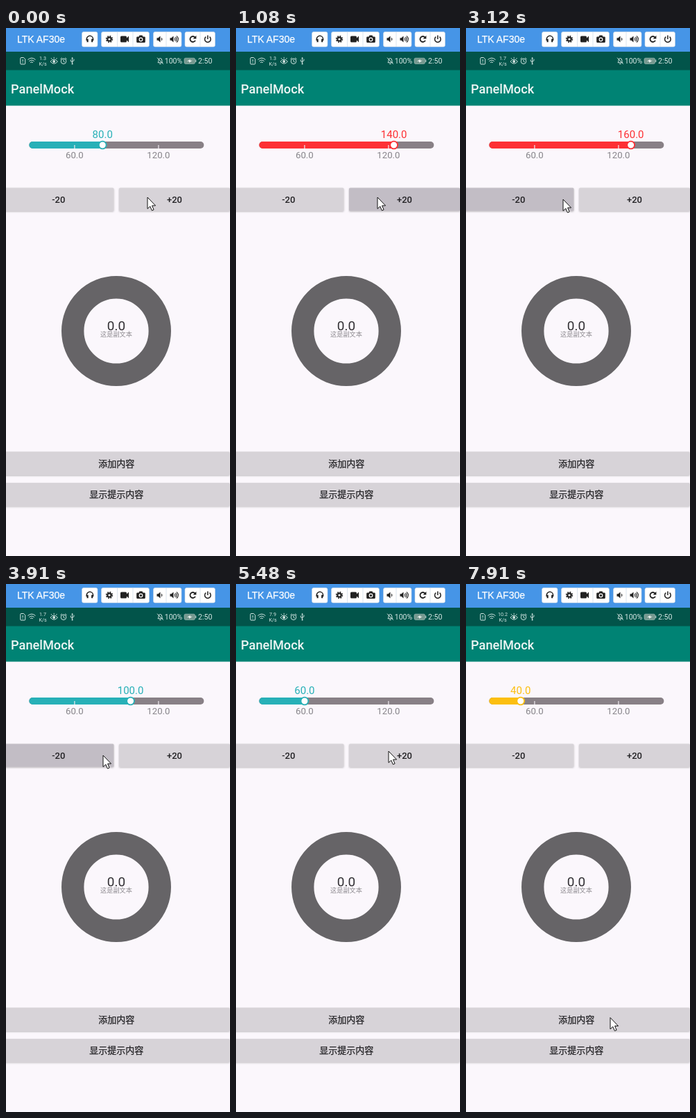
An HTML page that plays this animation: 323 px wide and 758 px high, repeating every 8 s.

```html
<!DOCTYPE html>
<html lang="zh">
<head>
<meta charset="utf-8">
<title>Gauge screen</title>
<style>
html, body { margin: 0; width: 100%; height: 100%; overflow: hidden; background: #fbf7fc; }
svg { display: block; width: 100vw; height: 100vh; }
text { font-family: Roboto, "Noto Sans CJK SC", "Noto Sans CJK", sans-serif; }
.mid { text-anchor: middle; }
.btn { font-size: 13px; font-weight: 500; fill: #222124; text-anchor: middle; }
.wide { stroke: #222124; stroke-width: .25; }
.tick { font-size: 13.2px; fill: #87858a; text-anchor: middle; }
.bar { fill: none; stroke-width: 10; stroke-linecap: round; }
.line { fill: none; stroke: #d3e4e1; stroke-width: 1; }
.key { fill: #fff; stroke: #c4d3e2; stroke-width: .6; }
.ico { fill: #222; }
.pen { fill: none; stroke: #222; stroke-width: 1.5; }
</style>
</head>
<body>
<svg viewBox="0 0 323 758">
  <defs>
    <filter id="shade" x="-5%" y="-20%" width="110%" height="150%">
      <feDropShadow dx="0" dy="1" stdDeviation=".8" flood-color="#555" flood-opacity=".38"/>
    </filter>
  </defs>

  <!-- mirror window toolbar -->
  <rect width="323" height="34.5" fill="#4695e7"/>
  <text x="16" y="21" fill="#fff" stroke="#fff" stroke-width=".25" font-size="14" style="font-family:'Liberation Sans',Arial,sans-serif">LTK AF30e</text>
  <g class="key">
    <rect x="109.5" y="5.5" width="22.5" height="21.5" rx="2.5"/>
    <rect x="137.5" y="5.5" width="69" height="21.5" rx="2.5"/>
    <rect x="212.5" y="5.5" width="40.5" height="21.5" rx="2.5"/>
    <rect x="258" y="5.5" width="43.5" height="21.5" rx="2.5"/>
    <path d="M160.5 6V27M183 6V27M231 6V27M280 6V27"/>
  </g>
  <path class="pen" d="M116.2 18V16a4.7 4.7 0 0 1 9.4 0V18"/>
  <path class="ico" d="M116.5 15.8h2.2v4.4h-2.2zM123.1 15.8h2.2v4.4h-2.2z"/>
  <circle class="pen" cx="149" cy="16" r="2.7" style="stroke-width:2.2"/>
  <circle class="pen" cx="149" cy="16" r="4.4" style="stroke-width:1.6;stroke-dasharray:1.73 1.73"/>
  <path class="ico" d="M166.5 11.5h6q1.5 0 1.5 1.5v1.5l3-3v9l-3-3v1.5q0 1.5-1.5 1.5h-6q-1.5 0-1.5-1.5v-6q0-1.5 1.5-1.5z"/>
  <path class="ico" d="M189.5 12.5h2l1-2h4l1 2h2q1.3 0 1.3 1.3v5.9q0 1.3-1.3 1.3h-10q-1.3 0-1.3-1.3v-5.9q0-1.3 1.3-1.3z"/>
  <circle cx="194.5" cy="16.5" r="2.3" fill="none" stroke="#fff" stroke-width="1.2"/>
  <path class="ico" d="M217.5 14.3h2l3-2.8v9l-3-2.8h-2zM236.5 14.3h2l3-2.8v9l-3-2.8h-2z"/>
  <path class="pen" style="stroke-width:1.1" d="M224 14.3q1.7 1.7 0 3.4M243 14.3q1.7 1.7 0 3.4M244.5 12.8q3.2 3.2 0 6.4M246 11.3q4.8 4.7 0 9.4"/>
  <path class="pen" style="stroke-width:1.8" d="M272.5 13.4A4 4 0 1 0 273 17.8"/>
  <path class="ico" d="M274.4 10.8v4.7h-4.7z"/>
  <path class="pen" d="M288.3 12.7a4.3 4.3 0 1 0 5.2 0M290.9 10.6V16"/>

  <!-- status bar -->
  <rect y="34" width="323" height="27" fill="#02544a"/>
  <g class="line">
    <path d="M20.8 43.5q0-1 1-1h3.7l2.2 2.2v6.3q0 1-1 1h-4.9q-1 0-1-1zM24.2 45v3.3M24.2 49.4v1"/>
    <path d="M31.5 45.5q5.5-4.8 11 0M33.3 47.7q3.7-3.2 7.4 0M35.1 49.6q1.9-1.6 3.8 0"/>
    <path d="M64 48.2q5.2-6.4 10.4 0q-5.2 6-10.4 0zM66 44.5l-1-1.5M69.2 43.6v-1.8M72.4 44.5l1-1.5"/>
    <circle cx="69.2" cy="48" r="1.5" fill="#d3e4e1"/>
    <circle cx="83" cy="47.7" r="3.8"/>
    <path d="M83 45.3v2.6l1.7 1M78.5 44.7l2.2-2M87.5 44.7l-2.2-2"/>
    <path d="M95.6 43v8.5M93.3 45.5v2.2l2.3 1.6M97.9 44.6v2.2l-2.3 1.6"/>
    <path d="M219 49.7q1-1 1-3.2q0-3 2.4-3t2.4 3q0 2.2 1 3.2zM221.3 51.5h2.2M218 42.7l8.8 9"/>
  </g>
  <path fill="#d3e4e1" d="M94.3 43.7l1.3-2 1.3 2z"/>
  <circle cx="95.6" cy="51.6" r="1" fill="#d3e4e1"/>
  <g fill="#d8e7e4" font-size="10.6">
    <text x="228.7" y="51">100%</text>
    <text x="277" y="51">2:50</text>
    <g class="mid" font-size="7.2">
      <text id="speed" x="53" y="46.2"></text>
      <text x="53" y="53.6">K/s</text>
    </g>
  </g>
  <rect x="257" y="43.2" width="15.5" height="8.2" rx="1.8" fill="#76988f" stroke="#9dbab5" stroke-width=".7"/>
  <path fill="#9dbab5" d="M273 45.5h1.4v3.6H273z"/>
  <path fill="#eef5f3" d="M261 47.8l4.7-2.9v1.9h3l-4.7 3v-2z"/>

  <!-- app bar -->
  <rect y="60.5" width="323" height="51" fill="#008374"/>
  <text x="7" y="93.5" fill="#eff6f5" font-size="18.2" font-weight="500">PanelMock</text>

  <!-- slider -->
  <path class="bar" d="M38.4 168H280.4" stroke="#888086"/>
  <path id="fill" class="bar"/>
  <path d="M98.9 168v5M219.9 168v5" stroke="#eeeaf0" stroke-width="1.2"/>
  <text class="tick" x="98.9" y="187">60.0</text>
  <text class="tick" x="219.9" y="187">120.0</text>
  <circle id="thumb" cy="168" r="5.4" fill="#fff" stroke-width="1.8"/>
  <text id="label" class="mid" y="157.6" font-size="15"></text>

  <g id="buttons"></g>

  <!-- ring -->
  <circle cx="159" cy="435" r="62.8" fill="none" stroke="#666467" stroke-width="32.4"/>
  <text class="mid" x="159" y="434" font-size="19" fill="#333135">0.0</text>
  <text class="mid" x="159" y="443.4" font-size="9.2" fill="#8e8b90">这是副文本</text>

  <path id="cursor" d="M0 0V16.5L3.8 13 6.4 19 9.1 17.9 6.6 12H11.6Z" fill="#fff" stroke="#111" stroke-width="1"/>
</svg>
<script>
const LOOP = 8000;
const STEP = 130;   // refresh interval of the mirrored screen
const SLIDE = 200;  // time the thumb takes to reach a new value
const $ = id => document.getElementById(id);
const clamp = v => Math.max(0, Math.min(1, v));
const ease = u => u * u * (3 - 2 * u);
const mix = (a, b, u) => a + (b - a) * u;

// Clicks on each button; one click changes the value by 20.
const ups = [100, 500, 880, 1640, 2250, 5860];
const downs = [2950, 3440, 3570, 3700, 4170, 4510, 6490, 6560];

// Pointer moves: start, end, target x, target y.
const home = [204, 243];
const moves = [
  [1300, 1430, 202, 249],
  [2340, 2730, 140, 246],
  [5110, 5460, 220, 240],
  [5900, 6240, 117, 243],
  [6900, 7480, 217, 571],
  [7480, 7800, 208, 622.5]
];
const speeds = { 0: '1.3', 1560: '1.7', 4550: '7.9', 7540: '10.2' };

const past = (list, t) => list.filter(k => k <= t);
const valueAt = t => 80 + 20 * (past(ups, t).length - past(downs, t).length);

// The zones 0-60, 60-120 and 120-260 fill a quarter, a half and a quarter of the track.
function position(v) {
  const share = clamp(v / 60) + 2 * clamp((v - 60) / 60) + clamp((v - 120) / 140);
  return 38.4 + 60.5 * share;
}

function pointerAt(t) {
  return moves.reduce(([x, y], [from, to, nx, ny]) => {
    const u = ease(clamp((t - from) / (to - from)));
    return [mix(x, nx, u), mix(y, ny, u)];
  }, home);
}

function button(x, y, w, h, name, id) {
  const ripple = id ? `<clipPath id="${id}Clip"><rect x="${x}" y="${y}" width="${w}" height="${h}" rx="1.5"/></clipPath>
    <g clip-path="url(#${id}Clip)" fill="#1c1830"><rect id="${id}Tint" x="${x}" y="${y}" width="${w}" height="${h}"/>
    <circle id="${id}Wave"/></g>` : '';
  return `<rect x="${x}" y="${y}" width="${w}" height="${h}" rx="1.5" fill="#d7d3d8" filter="url(#shade)"/>
    ${ripple}<text class="btn ${id ? '' : 'wide'}" x="${x + w / 2}" y="${y + h / 2 + 4.6}">${name}</text>`;
}

$('buttons').innerHTML =
  button(-4, 229.5, 159.5, 33.3, '-20', 'minus') +
  button(163, 229.5, 160, 33.3, '+20', 'plus') +
  button(-4, 608.3, 326.5, 33.8, '添加内容') +
  button(-4, 653, 326.5, 33.6, '显示提示内容');

function set(id, attrs) {
  for (const k in attrs) $(id).setAttribute(k, attrs[k]);
}

function ripple(id, clicks, t) {
  const start = past(clicks, t).pop() ?? -LOOP;
  const age = t - start;
  const power = clamp((400 - age) / 190);
  const [cx, cy] = pointerAt(start);
  set(id + 'Wave', { cx, cy, r: .0072 * age * age, 'fill-opacity': .08 * power * clamp(age / 140) });
  set(id + 'Tint', { 'fill-opacity': .03 * power });
}

function draw(time) {
  const t = Math.floor(time / STEP) * STEP;
  const value = valueAt(t);
  const color = value < 60 ? '#fcbf10' : value < 120 ? '#27b0b7' : '#fd3134';

  // The thumb slides from the value before the latest click.
  const click = Math.max(-SLIDE, ...past([...ups, ...downs], t));
  const x = mix(position(valueAt(click - 1)), position(value), ease(clamp((t - click) / SLIDE)));

  set('fill', { d: `M38.4 168H${x - 4}`, stroke: color });
  set('thumb', { cx: x, stroke: color });
  set('label', { x, fill: color });
  $('label').textContent = value.toFixed(1);
  $('speed').textContent = speeds[past(Object.keys(speeds), t).pop()];

  ripple('minus', downs, t);
  ripple('plus', ups, t);
  set('cursor', { transform: `translate(${pointerAt(t)})` });
}

const begin = performance.now();
function tick() {
  draw((performance.now() - begin) % LOOP);
  requestAnimationFrame(tick);
}
tick();
</script>
</body>
</html>
```
